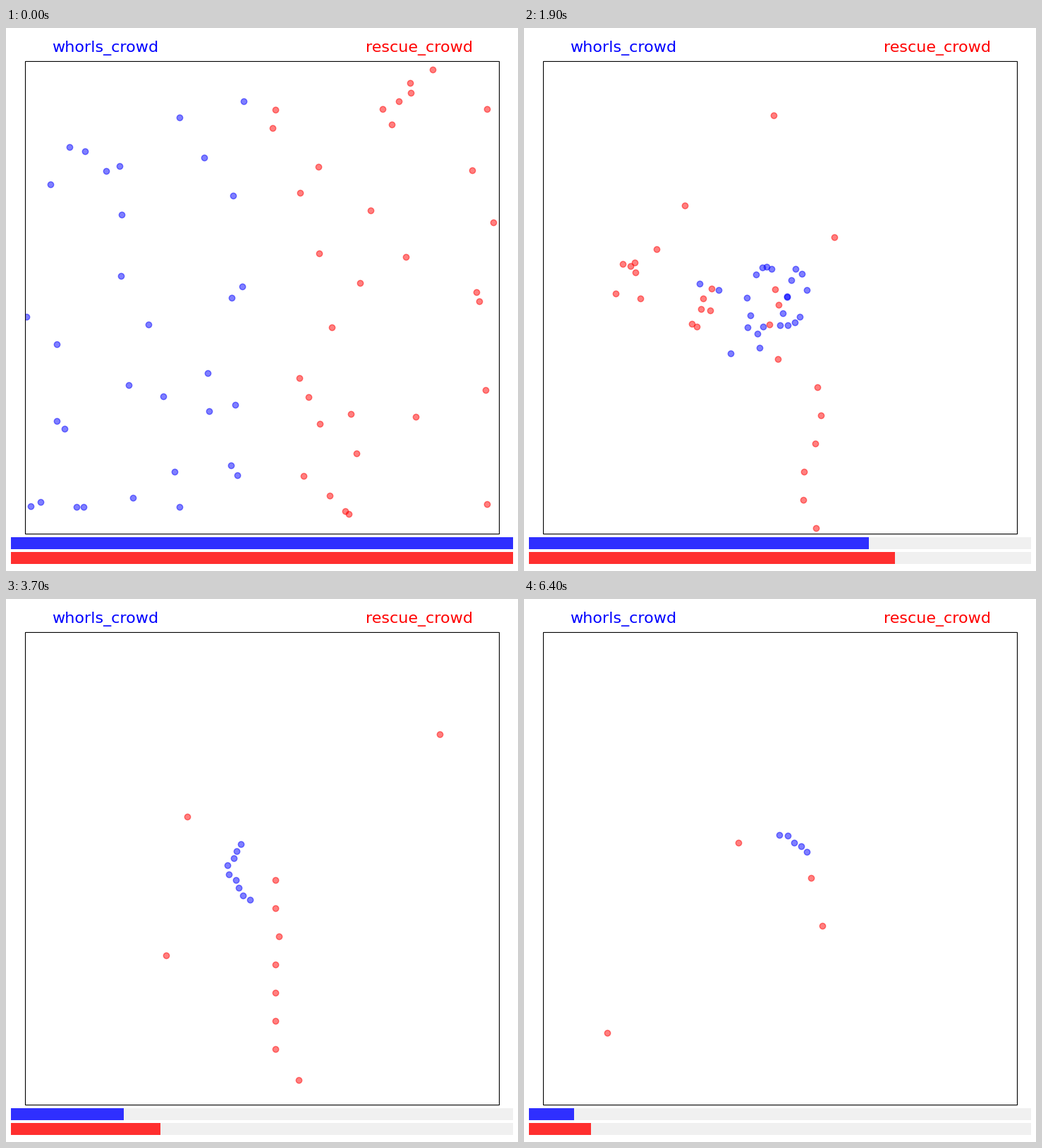
A matplotlib script for the animation above (6450 ms loop, 726 by 771 pixels).

```python
import matplotlib.pyplot as plt
import numpy as np
from matplotlib.animation import FuncAnimation
from matplotlib.patches import Rectangle

W, H, DPI = 726, 771, 100
FRAMES, STEP_MS = 129, 50
LEFT, TOP, SIDE = 27.2, 46.8, 671.4
CORNER = np.array([LEFT, TOP])
CENTER = np.array([362.5, 382.5])
SPEED = SIDE / 100              # largest step per axis and frame
SPIN, GAP = 11.5, 15            # vortex turn per frame, angle between dots
RISE = 57                       # when the column of red dots starts to climb

rng = np.random.default_rng(12)


def scatter(count, x0, x1, y0, y1):
    return rng.uniform((x0, y0), (x1, y1), (count, 2))


def chase(start, goal, reach):
    """Go straight to the goal, each axis at its own pace, and stop there."""
    return start + np.clip(goal - start, -reach, reach)


# Blue: a vortex that forms on a ring around the centre
blue_start = scatter(32, 28, 353, 50, 715)
slot = np.arange(32)
radius = rng.uniform(39, 49, 32)


def blue_dots(n):
    angle = np.radians(130 + GAP * slot + SPIN * (n - 74))
    ring = radius[:, None] * np.column_stack([np.cos(angle), -np.sin(angle)])
    return chase(blue_start, CENTER, SPEED * n) + ring * min(n / 35, 1)


# Red: four lone dots on long routes of (time, x, y) ...
ROUTES = [
    [(0, 443, 197), (23, 371, 311), (57, 528, 280), (65, 555, 252),
     (77, 635, 172), (111, 407, 396)],
    [(0, 11, 5), (23, 165, 157), (57, 307, 372), (91, 207, 246),
     (103, 264, 303), (116, 222, 265), (128, 304, 346)],
    [(0, 20, 276), (23, 174, 427), (57, 319, 412), (93, 125, 610),
     (110, 239, 495), (128, 118, 616)],
    [(0, 378, 142), (23, 305, 190), (57, 415, 41), (103, 414, -39),
     (128, 423, -207)],
]

# ... a column below the centre, a flank that leaves on the right
# and returns on the left, and the rest that go straight in
column_start = scatter(7, 415, 510, 480, 712)
column_x = rng.uniform(355, 440, 7)
lanes = np.column_stack([column_x, 470 + 40 * np.arange(7)])
flank_start = scatter(12, 545, 692, 55, 715) - (SIDE, 0)
rest_start = scatter(9, 375, 535, 50, 715)
flank_goal = CENTER + rng.normal(0, 20, (12, 2))
rest_goal = CENTER + rng.normal(0, 25, (9, 2))


def red_dots(n):
    lone = []
    for route in ROUTES:
        t, x, y = zip(*route)
        lone.append((np.interp(n, t, x), np.interp(n, t, y)))
    reach = SPEED * n
    column = chase(column_start, lanes, reach)
    column = chase(column, np.array([382, CENTER[1]]),
                   np.array([2, 4.2]) * max(n - RISE, 0))
    return np.vstack([lone, column, chase(flank_start, flank_goal, reach),
                      chase(rest_start, rest_goal, reach)])


fig = plt.figure(figsize=(W / DPI, H / DPI), dpi=DPI, facecolor="white")
ax = fig.add_axes([0, 0, 1, 1])
ax.set(xlim=(0, W), ylim=(H, 0))
ax.axis("off")

box = Rectangle(CORNER, SIDE, SIDE, fill=False, ec="black", lw=0.8, zorder=5)
ax.add_patch(box)


class Team:
    def __init__(self, color, dots, name, name_x, bar_y, fill, times, alive,
                 health):
        self.dots = dots
        self.times, self.alive, self.health = times, alive, health
        ax.text(name_x, 34, name, color=color, fontsize=16, ha="center",
                va="baseline", family="DejaVu Sans")
        self.line, = ax.plot([], [], "o", color=color, ms=6, alpha=0.5)
        self.line.set_clip_path(box)
        self.bar_width = 0.98 * W
        for c in ("#f0f0f0", fill):
            self.bar = Rectangle((0.01 * W, bar_y), self.bar_width, 17.4,
                                 fc=c, lw=0)
            ax.add_patch(self.bar)

    def draw(self, n):
        left = round(np.interp(n, self.times, self.alive))
        spots = CORNER + (self.dots(n)[:left] - CORNER) % SIDE
        self.line.set_data(spots[:, 0], spots[:, 1])
        share = np.interp(n, self.times, self.health)
        self.bar.set_width(self.bar_width * share)


# Dots alive and health left at a few times; both teams heal now and then
teams = [
    Team("blue", blue_dots, "whorls_crowd", 140.5, 723, "#2f2fff",
         [0, 23, 38, 57, 65, 74, 89, 103, 117, 128],
         [32, 27, 24, 16, 12, 9, 9, 9, 7, 5],
         [1, .741, .677, .349, .218, .225, .149, .189, .071, .089]),
    Team("red", red_dots, "rescue_crowd", 586, 743.8, "#ff2f2f",
         [0, 23, 38, 57, 74, 103, 128],
         [32, 30, 26, 16, 11, 8, 4],
         [1, .776, .729, .414, .297, .236, .123]),
]


def draw(n):
    for team in teams:
        team.draw(n)
    return [a for team in teams for a in (team.line, team.bar)]


anim = FuncAnimation(fig, draw, frames=FRAMES, interval=STEP_MS,
                     repeat=True, repeat_delay=0, blit=False)
plt.show()
```
